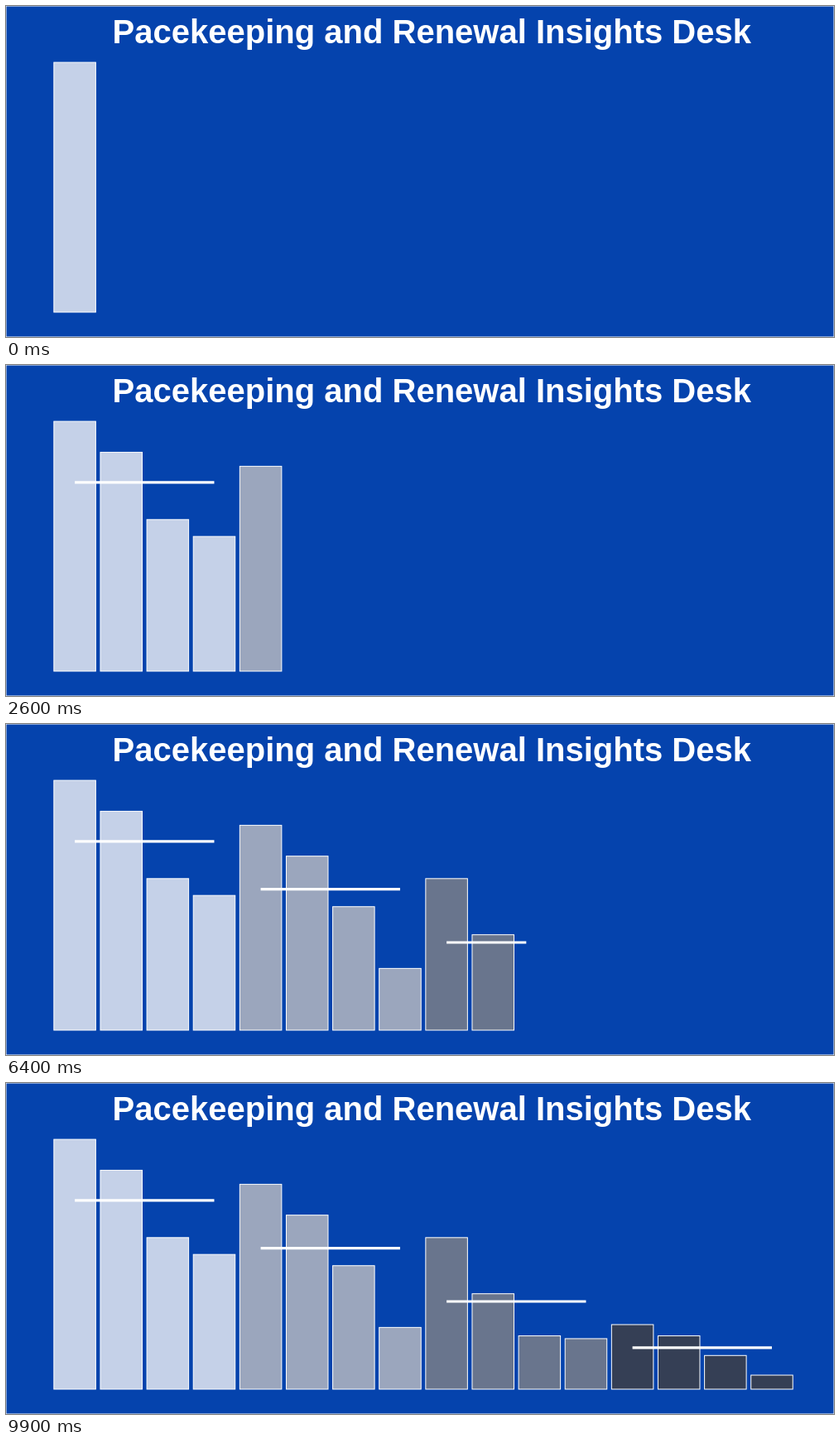
Recreate the animation shown at these times as an HTML page. Size 1000x400 px, loop 10000 ms.

```html
<!DOCTYPE html>
<html lang="en">
<head>
<meta charset="utf-8">
<title>Bar chart reveal</title>
<style>
  html, body { margin: 0; width: 100%; height: 100%; overflow: hidden; background: #0543ad; }
  svg { display: block; width: 1000px; height: 400px; }
  text { font: bold 40px "Liberation Sans", Arial, sans-serif; fill: #fff; }
  .bar { stroke: #fff; stroke-width: 1; }
  .mean { stroke: #fff; stroke-width: 3.2; }
  .edge { fill: none; stroke: #fff; stroke-width: 1; }
</style>
</head>
<body>
<svg id="chart" viewBox="0 0 1000 400">
  <rect width="1000" height="400" fill="#0543ad"/>
  <rect class="edge" width="1000" height="400"/>
  <text x="514.3" y="45" text-anchor="middle">Pacekeeping and Renewal Insights Desk</text>
</svg>
<script>
const LOOP = 10000, STEP = 100, LAST = LOOP / STEP - 1;
const LEFT = 83.1, PITCH = 56.125, WIDTH = PITCH * 0.9;
const BASE = 370, UNIT = 3.392;

const groups = [
  { color: "#c5d1e8", values: [89, 78, 54, 48] },
  { color: "#9ba6bd", values: [73, 62, 44, 22] },
  { color: "#69758d", values: [54, 34, 19, 18] },
  { color: "#353f55", values: [23, 19, 12, 5] }
];

const chart = document.getElementById("chart");
const centre = i => LEFT + i * PITCH;
const height = v => BASE - v * UNIT;
// Each bar lands on the step nearest to its share of the loop.
const stepOf = i => Math.round(i * LAST / 15);

function add(tag, attrs) {
  const el = document.createElementNS(chart.namespaceURI, tag);
  for (const key in attrs) el.setAttribute(key, attrs[key]);
  return chart.appendChild(el);
}

const bars = groups.flatMap((g, n) => g.values.map((v, k) => {
  const i = n * 4 + k;
  return add("rect", {
    class: "bar", fill: g.color, x: centre(i) - WIDTH / 2,
    y: height(v), width: WIDTH, height: v * UNIT
  });
}));

const means = groups.map((g, n) => {
  const y = height(g.values.reduce((a, b) => a + b) / 4);
  const x = centre(n * 4);
  return add("line", { class: "mean", x1: x, x2: x, y1: y, y2: y });
});

// Position along the bars, linear between neighbouring landings.
function reach(step) {
  let i = 0;
  while (i < 15 && stepOf(i + 1) <= step) i++;
  if (i === 15) return i;
  return i + (step - stepOf(i)) / (stepOf(i + 1) - stepOf(i));
}

function draw(time) {
  const pos = reach(Math.floor(time % LOOP / STEP));
  bars.forEach((bar, i) => bar.setAttribute("visibility", i <= pos ? "visible" : "hidden"));
  means.forEach((line, n) => {
    const first = n * 4;
    const end = Math.min(pos, first + 3);
    line.setAttribute("visibility", end > first ? "visible" : "hidden");
    line.setAttribute("x2", centre(Math.max(end, first)));
  });
}

function tick() {
  draw(performance.now());
  requestAnimationFrame(tick);
}
draw(0);
requestAnimationFrame(tick);
</script>
</body>
</html>
```
